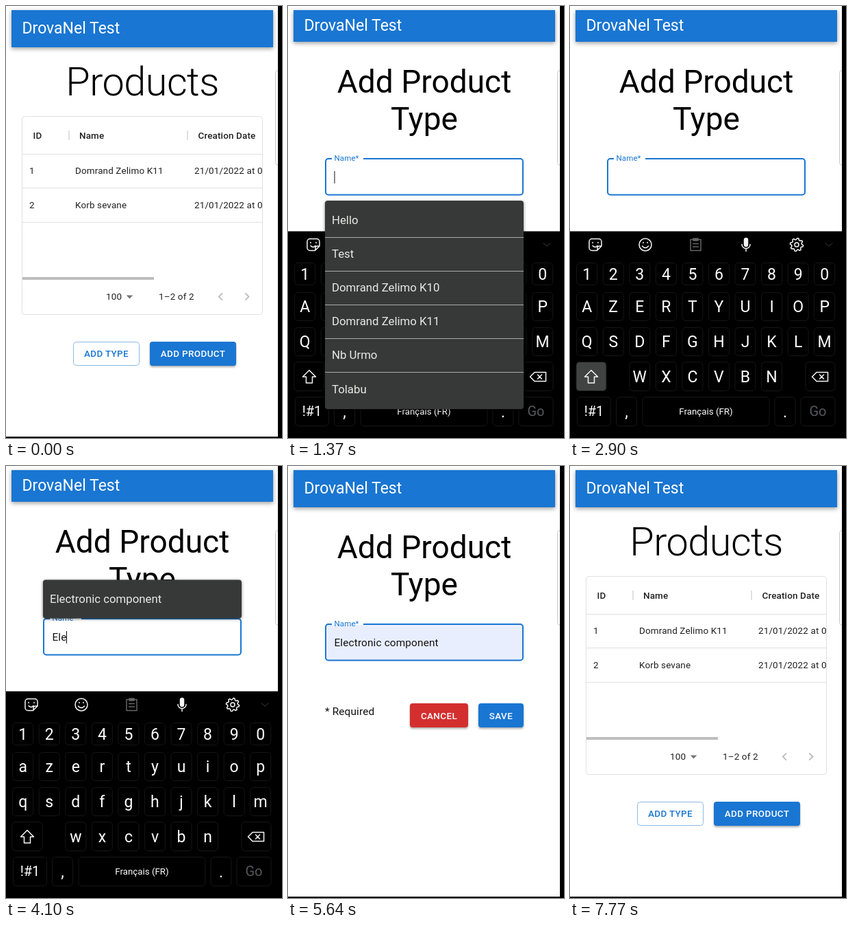
Recreate the animation shown at these times as an HTML page. Size 403 by 628 pixels, loop 8 s.

```html
<!DOCTYPE html>
<html lang="en">
<head>
<meta charset="utf-8">
<title>Add product type</title>
<style>
  html, body { margin: 0; width: 100%; height: 100%; overflow: hidden; background: #fff; }
  svg { display: block; width: 403px; height: 628px; font-family: Roboto, Arial, sans-serif; }
  text { white-space: pre; }
  .mid { text-anchor: middle; }
  .cell { font-size: 13.44px; letter-spacing: .144px; fill: #212121; }
  .head { font-weight: 500; }
  .btn { font-size: 13.44px; font-weight: 500; letter-spacing: .384px; text-anchor: middle; fill: #fff; }
  .raised { filter: drop-shadow(0 2px 1.5px rgba(0,0,0,.33)); }
  .bar { filter: drop-shadow(0 2px 3px rgba(0,0,0,.4)); }
  .body { font-size: 15.36px; letter-spacing: .144px; fill: #111; }
  .rule { stroke: #e0e0e0; fill: none; }
  .list { filter: drop-shadow(0 1px 2px rgba(0,0,0,.5)); }
  .item { font-size: 16.8px; fill: #e8e8e7; }
  .key { fill: none; stroke: #161616; }
  .cap { fill: #fff; text-anchor: middle; }
  .icon { fill: none; stroke: #f6f6f6; stroke-width: 1.5; stroke-linejoin: round; stroke-linecap: round; }
</style>
</head>
<body>
<svg viewBox="0 0 403 628">
  <defs>
    <clipPath id="tableClip"><rect x="24" y="161" width="350" height="287"/></clipPath>
    <clipPath id="saveClip"><rect x="278" y="345" width="66" height="35" rx="4"/></clipPath>
  </defs>
  <rect width="403" height="628" fill="#fff"/>
  <rect x="393.5" y="93.5" width="12" height="138" rx="4" fill="#fff" stroke="#c8c8c8"/>

  <g data-on="0-7170 7300-8000">
    <rect id="toolbar" class="bar" x="8" y="6" width="382" height="54" fill="#1976d2"/>
    <text id="title" x="23.5" y="40" font-size="23" fill="#fff">DrovaNel Test</text>
  </g>

  <g data-on="0-500 7300-8000">
    <text class="mid" x="199" y="130" font-size="57.6" font-weight="300" letter-spacing="-.5">Products</text>
    <rect class="rule" x="23.5" y="160.5" width="351" height="288" rx="4"/>
    <path class="rule" d="M24 215.5H374"/>
    <g clip-path="url(#tableClip)" data-on="0-500 7770-8000">
      <g class="cell head">
        <text x="39.5" y="193">ID</text>
        <text x="107" y="193">Name</text>
        <text x="280.5" y="193">Creation Date</text>
      </g>
      <path class="rule" stroke-width="2" d="M92 181V195M265 181V195"/>
      <path class="rule" d="M24 264.5H374M24 314.5H374"/>
      <g class="cell">
        <text x="34" y="244">1</text>
        <text x="101" y="244">Domrand Zelimo K11</text>
        <text x="275" y="244">21/01/2022 at 0</text>
        <text x="34" y="294">2</text>
        <text x="101" y="294">Korb sevane</text>
        <text x="275" y="294">21/01/2022 at 0</text>
        <text x="223" y="427">1–2 of 2</text>
      </g>
      <rect x="24" y="394" width="192" height="4" fill="#bdbdbd"/>
    </g>
    <text class="cell" x="223" y="427" data-on="7300-7770">0–0 of 0</text>
    <text class="cell" x="146" y="427">100</text>
    <path fill="#757575" d="M175.7 420.6h9.6l-4.8 4.8z"/>
    <path fill="none" stroke="#bdbdbd" stroke-width="1.9" d="M316 417.4l-5.1 5.1 5.1 5.1M349.3 417.4l5.1 5.1-5.1 5.1"/>
    <rect x="98.5" y="488.5" width="96" height="34" rx="4" fill="none" stroke="#8cbae8"/>
    <text class="btn" x="146.5" y="510" style="fill:#1976d2">ADD TYPE</text>
    <rect class="raised" x="210" y="488" width="126" height="35" rx="4" fill="#1976d2"/>
    <text class="btn" x="273" y="510">ADD PRODUCT</text>
  </g>

  <g id="form" data-on="500-7170">
    <g class="mid" font-size="46.08">
      <text x="199" y="134">Add Product</text>
      <text x="199" y="188">Type</text>
    </g>
    <rect x="56" y="231" width="287" height="51" rx="3" fill="#e8eefd" data-on="5040-6300"/>
    <path data-on="500-970 6240-7170" fill="none" stroke="#c4c4c4" d="M109 229.5H339.5a4 4 0 0 1 4 4V279a4 4 0 0 1-4 4H58.5a4 4 0 0 1-4-4V233.5a4 4 0 0 1 4-4H63"/>
    <path data-on="500-970" stroke="#c4c4c4" d="M63 229.5H109"/>
    <path data-on="970-6240" fill="none" stroke="#1976d2" stroke-width="2" d="M110 230H339a4 4 0 0 1 4 4V278.5a4 4 0 0 1-4 4H59a4 4 0 0 1-4-4V234a4 4 0 0 1 4-4H64"/>
    <text id="label" class="body">Name*</text>
    <text id="value" class="body" x="67.5" y="262"></text>
    <rect id="caret" y="248" width="1" height="18" fill="#111"/>
    <text class="body" x="54" y="362">* Required</text>
    <rect class="raised" x="178" y="345" width="85" height="35" rx="4" fill="#d32f2f"/>
    <text class="btn" x="220.5" y="367.5">CANCEL</text>
    <rect class="raised" x="278" y="345" width="66" height="35" rx="4" fill="#1976d2"/>
    <g clip-path="url(#saveClip)"><circle id="ripple" cx="336" cy="362" fill="#fff"/></g>
    <text class="btn" x="311" y="367.5">SAVE</text>
  </g>

  <g id="snack">
    <rect class="raised" x="8" y="573" width="182" height="46" rx="4" fill="#2e7d32"/>
    <circle cx="34" cy="596" r="8.5" fill="none" stroke="#fff" stroke-width="1.7"/>
    <path fill="none" stroke="#fff" stroke-width="1.7" d="M30 596l3 3 5-6"/>
    <text class="cell head" x="55" y="601" style="fill:#fff">Product type saved</text>
  </g>

  <g id="keyboard">
    <rect y="327.5" width="397" height="310"/>
    <g class="icon">
      <path d="M32 338.5H42a4 4 0 0 1 4 4V349l-6.5 6.5H32a4 4 0 0 1-4-4V342.5a4 4 0 0 1 4-4zM46 349h-3a3 3 0 0 0-3 3v3M33 343.5v1M41 343.5v1M33 348.5q4 4 7 0"/>
      <circle cx="110" cy="347" r="9"/>
      <path d="M107 343.5v1M113 343.5v1M105.5 349q4.5 5 9 0"/>
      <path stroke="#666" d="M176 339.5h15v16h-15zM180 338h7v3h-7zM179.5 345.5h8M179.5 350h8"/>
      <path d="M251 346.5a6 6 0 0 0 12 0M257 352.5v4"/>
      <rect x="254.5" y="337.5" width="5" height="12" rx="2.5" fill="#f6f6f6"/>
      <circle cx="331" cy="347" r="3"/>
      <path id="gear"/>
      <path stroke="#242424" d="M373 345l5 4 5-4"/>
    </g>
    <rect x="9" y="517" width="44" height="43" rx="5" fill="#414242" data-on="1970-3640"/>
    <rect x="9" y="416" width="31" height="42" rx="5" fill="#3a3b3b" data-on="2370-2500"/>
    <rect x="317" y="467" width="32" height="42" rx="5" fill="#3a3b3b" data-on="3840-3900"/>
    <g id="keys"></g>
    <path class="icon" d="M31 529.5l9.5 9.5h-5v9h-9v-9h-5zM360 532.5h16.5v13h-16.5l-6.5-6.5zM364.5 536l6 6m0-6l-6 6"/>
    <g data-on="2370-2500">
      <rect x="9.5" y="335.5" width="52" height="69" rx="5" fill="#070707" stroke="#242525"/>
      <text class="mid" x="35" y="384.5" font-size="37" fill="#6a7074">A</text>
    </g>
  </g>

  <g id="history" class="list" data-on="970-2500"></g>
  <g class="list" data-on="2640-2900 3640-4900">
    <rect x="54" y="165.5" width="290" height="56" rx="4" fill="#373938"/>
    <text class="item" x="64" y="199" data-on="2640-2900">Accessory</text>
    <text class="item" x="64" y="199" data-on="3640-4900">Electronic component</text>
  </g>

  <rect x="397" width="6" height="628"/>
  <rect y="626" width="403" height="2"/>
</svg>
<script>
const LOOP = 8000, TICK = 200 / 3;
const $ = id => document.getElementById(id);
const clamp = v => Math.min(1, Math.max(0, v));
const easeOut = p => 1 - (1 - p) ** 3;

function add(parent, tag, attrs, text = '') {
  const el = document.createElementNS('http://www.w3.org/2000/svg', tag);
  for (const name in attrs) el.setAttribute(name, attrs[name]);
  el.textContent = text;
  return parent.appendChild(el);
}

// Autofill history list
add($('history'), 'rect', { x: 54, y: 283, width: 290, height: 303, rx: 4, fill: '#373938' });
['Hello', 'Test', 'Domrand Zelimo K10', 'Domrand Zelimo K11', 'Nb Urmo', 'Tolabu'].forEach((name, i) => {
  add($('history'), 'text', { class: 'item', x: 64, y: 317 + i * 49.1 }, name);
  if (i) add($('history'), 'rect', { x: 54, y: 287 + i * 49, width: 290, height: 1, fill: '#a9aaa9' });
});

// Keyboard keys
function key(cx, top, w, h, label, size = 23, fill = '#fff') {
  add($('keys'), 'rect', { class: 'key', x: cx - w / 2, y: top + .5, width: w, height: h, rx: 5 });
  return add($('keys'), 'text', { class: 'cap', x: cx, y: top + h / 2 + size * .37, 'font-size': size, style: `fill:${fill}` }, label);
}
const column = i => 24.7 + i * 38.55;
const row = (chars, top, h, first = 0) => [...chars].map((c, i) => key(column(i + first), top, 30, h, c));
row('1234567890', 373, 32);
const letters = [
  ...row('azertyuiop', 416, 41),
  ...row('qsdfghjklm', 467, 41),
  ...row('wxcvbn', 517, 42, 2)
];
key(31, 517, 44, 42, '');
key(365.5, 517, 43, 42, '');
key(35, 568, 49, 42, '!#1', 20);
key(82.5, 568, 30, 42, ',');
key(198.5, 568, 185, 42, 'Français (FR)', 13.3);
key(314, 568, 30, 42, '.');
key(362, 568, 50, 42, 'Go', 20, '#55585a');

// Gear outline: eight alternating rim sections
$('gear').setAttribute('d', 'M' + Array.from({ length: 32 }, (_, i) => {
  const a = (i + .5) * Math.PI / 16, r = i % 4 < 2 ? 9.6 : 7.4;
  return `${(331 + r * Math.cos(a)).toFixed(1)} ${(347 + r * Math.sin(a)).toFixed(1)}`;
}).join('L') + 'z');

const timed = [...document.querySelectorAll('[data-on]')].map(el => ({
  el, spans: el.dataset.on.split(' ').map(s => s.split('-').map(Number))
}));
const within = (t, spans) => spans.some(([from, to]) => t >= from && t < to);

// [start, text]
const typing = [[0, ''], [2370, 'A'], [2900, ''], [3440, 'E'], [3840, 'El'], [4100, 'Ele'],
  [5040, 'Electronic component'], [6300, '']];
// [from, to, x, colour]
const carets = [[970, 1100, 67.5, '#bbb'], [1100, 1500, 67.5, '#111'], [1970, 2370, 67.5, '#111'],
  [2370, 2900, 77, '#111'], [3440, 3840, 76, '#111'], [3840, 4100, 80, '#111'],
  [4100, 4700, 88, '#111'], [5970, 6240, 220, '#111']];

function draw(t) {
  // Motion advances at 15 steps a second
  const q = 500 + Math.floor((t - 500 + .5) / TICK) * TICK;
  for (const { el, spans } of timed) el.style.display = within(t, spans) ? '' : 'none';

  const compact = t >= 1370 && t < 5440;
  $('toolbar').setAttribute('height', compact ? 46 : 54);
  $('title').setAttribute('y', compact ? 36 : 40);
  $('form').setAttribute('transform', `translate(0 ${compact ? -8 : 0})`);

  const shrink = easeOut(clamp((q - 920) / 200));
  $('label').setAttribute('transform', `translate(67.5 ${262 - 29 * shrink}) scale(${1 - .25 * shrink})`);
  $('label').style.fill = t >= 970 && t < 6240 ? '#1976d2' : '#666';

  $('value').textContent = typing.filter(([from]) => t >= from).pop()[1];
  const caret = carets.find(([from, to]) => t >= from && t < to);
  $('caret').style.display = caret ? '' : 'none';
  if (caret) {
    $('caret').setAttribute('x', caret[2]);
    $('caret').setAttribute('fill', caret[3]);
  }

  const hidden = clamp(t < 3000 ? 1 - (q - 1100) / 267 : (q - 5370) / 270) ** 2;
  $('keyboard').setAttribute('transform', `translate(0 ${45 * hidden})`);
  $('keyboard').setAttribute('opacity', clamp(1 - 1.15 * hidden));
  for (const el of letters) {
    el.textContent = t < 3640 ? el.textContent.toUpperCase() : el.textContent.toLowerCase();
  }

  const spread = clamp((q - 6200) / 550);
  $('ripple').setAttribute('r', t < 6240 ? 0 : 70 * (1 - (1 - spread) ** 2));
  $('ripple').setAttribute('opacity', .08 * clamp((6900 - q) / 200));

  const grow = t < 7170 ? easeOut(clamp((q - 6600) / 240)) : 0;
  const s = .75 + .25 * grow;
  $('snack').setAttribute('opacity', grow);
  $('snack').setAttribute('transform', `translate(99 596) scale(${s}) translate(-99 -596)`);
}

const start = performance.now();
function tick() {
  draw((performance.now() - start) % LOOP);
  requestAnimationFrame(tick);
}
tick();
</script>
</body>
</html>
```
